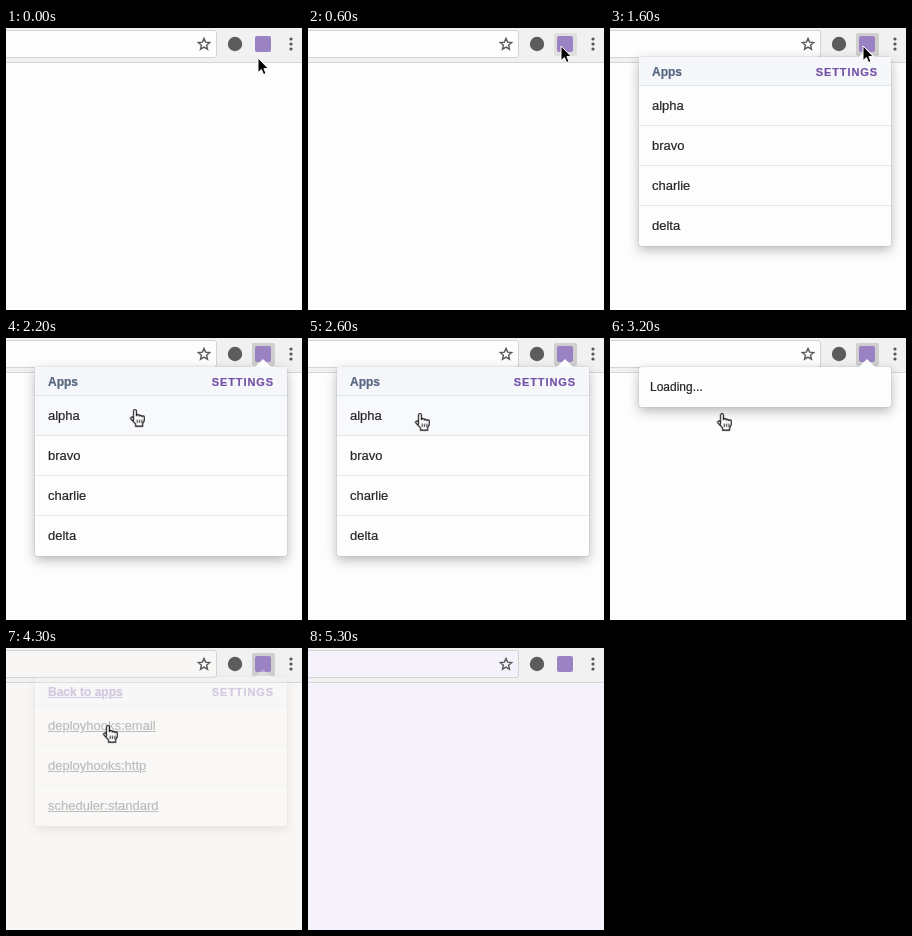
Recreate the animation shown at these times as an HTML page. Size 296 px wide and 282 px high, loop 6100 ms.

```html
<!DOCTYPE html>
<html lang="en">
<head>
<meta charset="utf-8">
<title>Browser extension popup</title>
<style>
  html, body { margin: 0; width: 100%; height: 100%; overflow: hidden; background: #fdfdfd; }
  * { box-sizing: border-box; }

  #stage { position: relative; width: 296px; height: 282px; overflow: hidden; font: 13px "Liberation Sans", Arial, sans-serif; color: #262626; -webkit-text-stroke: .2px; }
  #stage > * { position: absolute; }

  /* Every track is a 6.1 s loop of held poses. */
  .track { animation: 6.1s step-end infinite; }

  .page { inset: 35px 0 0; background: #fdfdfd; animation-name: tint; }
  .toolbar { inset: 0 0 auto; height: 35px; background: #f1f1f1; border-bottom: 1px solid #d5d5d5; }
  .address { left: -10px; top: 2px; width: 221px; height: 28px; background: #fdfdfd; border: 1px solid #d3d3d3; border-radius: 3px; animation-name: tint; }
  .button { left: 246px; top: 5px; width: 23px; height: 23px; border-radius: 2px; animation-name: press; }
  svg { inset: 0; width: 296px; height: 282px; }

  .panel { left: 29px; top: 29px; width: 252px; background: #fdfdfd; border-radius: 2px; box-shadow: 0 0 1px rgba(0, 0, 0, .45), 0 4px 12px rgba(0, 0, 0, .28); opacity: 0; }
  .panel::before { content: ""; position: absolute; left: 220px; top: -8px; border: solid transparent; border-width: 0 8px 8px; border-bottom-color: #fdfdfd; }
  .panel header { display: flex; justify-content: space-between; height: 29px; padding: 2px 13px 0; background: #f5f7fb; border-bottom: 1px solid #e1e5ec; font-size: 12px; font-weight: bold; line-height: 27px; color: #56667f; }
  .settings { font-size: 11px; letter-spacing: .9px; color: #7350a6; }
  .row { height: 40px; padding-left: 13px; line-height: 39px; border-bottom: 1px solid #e6e6e6; }
  .row:last-child { border: 0; }
  .link { text-decoration: underline; }
  header .link { color: #7350a6; }

  .loading { height: 40px; padding-left: 11px; font-size: 12px; line-height: 41px; animation-name: loading; }
  .apps { animation-name: apps; }
  .addons { animation-name: addons; }
  .hovered { animation-name: hover; }

  .cursor { animation-name: move; }
  .arrow { animation-name: arrow; }
  .hand { animation-name: hand; }

  @keyframes tint {
    0% { background: #fdfdfd; }
    68.8% { background: #f8f7f6; }
    73.7%, 100% { background: #f6f2fc; }
  }
  @keyframes press {
    0% { background: transparent; }
    4.9% { background: #dfdfdf; }
    13.1% { background: #d7d7d7; }
    14.7% { background: #cfcfcf; }
    73.7% { background: #dfdfdf; }
    75.4%, 100% { background: transparent; }
  }
  @keyframes loading {
    0% { opacity: 0; }
    19.6% { opacity: .35; }
    21.3% { opacity: .75; }
    22.9% { opacity: 1; }
    26.2% { opacity: 0; }
    47.5% { opacity: 1; }
    57.3%, 100% { opacity: 0; }
  }
  @keyframes apps {
    0% { opacity: 0; }
    26.2% { opacity: 1; }
    47.5%, 100% { opacity: 0; }
  }
  @keyframes addons {
    0% { opacity: 0; }
    57.3% { opacity: 1; }
    68.8% { opacity: .65; }
    70.4% { opacity: .28; }
    72.1%, 100% { opacity: 0; }
  }
  @keyframes hover {
    0% { background: transparent; }
    34.4%, 100% { background: #f7f9fd; }
  }
  @keyframes move {
    0% { transform: translate(252px, 30px); }
    1.6% { transform: translate(252px, 29px); }
    3.2% { transform: translate(252px, 27px); }
    4.9% { transform: translate(253px, 24px); }
    6.5% { transform: translate(253px, 21px); }
    8.1% { transform: translate(253px, 19px); }
    9.8% { transform: translate(253px, 18px); }
    27.8% { transform: translate(250px, 20px); }
    29.5% { transform: translate(235px, 26px); }
    31.1% { transform: translate(208px, 38px); }
    32.7% { transform: translate(176px, 52px); }
    34.4% { transform: translate(148px, 64px); }
    36% { transform: translate(128px, 71px); }
    37.7% { transform: translate(116px, 74px); }
    39.3% { transform: translate(111px, 75px); }
    60.6% { transform: translate(110px, 75px); }
    62.2% { transform: translate(107px, 76px); }
    63.9% { transform: translate(104px, 76px); }
    65.5% { transform: translate(102px, 77px); }
    67.2%, 100% { transform: translate(101px, 77px); }
  }
  @keyframes arrow {
    0% { opacity: 1; }
    34.4%, 100% { opacity: 0; }
  }
  @keyframes hand {
    0% { opacity: 0; }
    34.4% { opacity: 1; }
    73.7%, 100% { opacity: 0; }
  }
</style>
</head>
<body>
<div id="stage">
  <div class="page track"></div>
  <div class="toolbar"></div>
  <div class="address track"></div>
  <div class="button track"></div>

  <svg viewBox="0 0 296 282">
    <path d="M198 10.4 199.6 14.1 203.7 14.5 200.6 17.2 201.5 21.2 198 19.1 194.5 21.2 195.4 17.2 192.3 14.5 196.4 14.1Z" fill="none" stroke="#5a5a5a" stroke-width="1.4"/>
    <circle cx="229" cy="16" r="7.2" fill="#5c5c5c"/>
    <rect x="249" y="8" width="16" height="16" rx="2" fill="#9b82c2"/>
    <g fill="#555">
      <circle cx="285" cy="11" r="1.6"/>
      <circle cx="285" cy="16" r="1.6"/>
      <circle cx="285" cy="21" r="1.6"/>
    </g>
  </svg>

  <section class="panel loading track">Loading...</section>

  <section class="panel apps track">
    <header><span>Apps</span><span class="settings">SETTINGS</span></header>
    <div class="row hovered track">alpha</div>
    <div class="row">bravo</div>
    <div class="row">charlie</div>
    <div class="row">delta</div>
  </section>

  <section class="panel addons track">
    <header><span class="link">Back to apps</span><span class="settings">SETTINGS</span></header>
    <div class="row"><span class="link">deployhooks:email</span></div>
    <div class="row"><span class="link">deployhooks:http</span></div>
    <div class="row"><span class="link">scheduler:standard</span></div>
  </section>

  <svg viewBox="0 0 296 282">
    <g class="cursor track">
      <path class="arrow track" d="M0 0V14.6L3.4 11.5 5.6 16.5 8 15.5 5.9 10.6H10.3Z" fill="#000" stroke="#fff"/>
      <g class="hand track" stroke="#000" stroke-linejoin="round">
        <g transform="translate(-4.2 .2) scale(1.05 1.1)">
          <path fill="#fff" d="M3.5 10V1.8a1.4 1.4 0 0 1 2.8 0V6a1.3 1.3 0 0 1 2.6 .3a1.3 1.3 0 0 1 2.5 .6a1.2 1.2 0 0 1 2.3 .8V10.5L12.2 13V15.5H5.5V13.5L.8 8.6A1.2 1.2 0 0 1 2.6 7.2L3.5 8.5Z"/>
          <path d="M7 9.5v3M9.2 9.5v3M11.4 9.5v3" stroke-width=".8"/>
        </g>
      </g>
    </g>
  </svg>
</div>
</body>
</html>
```
